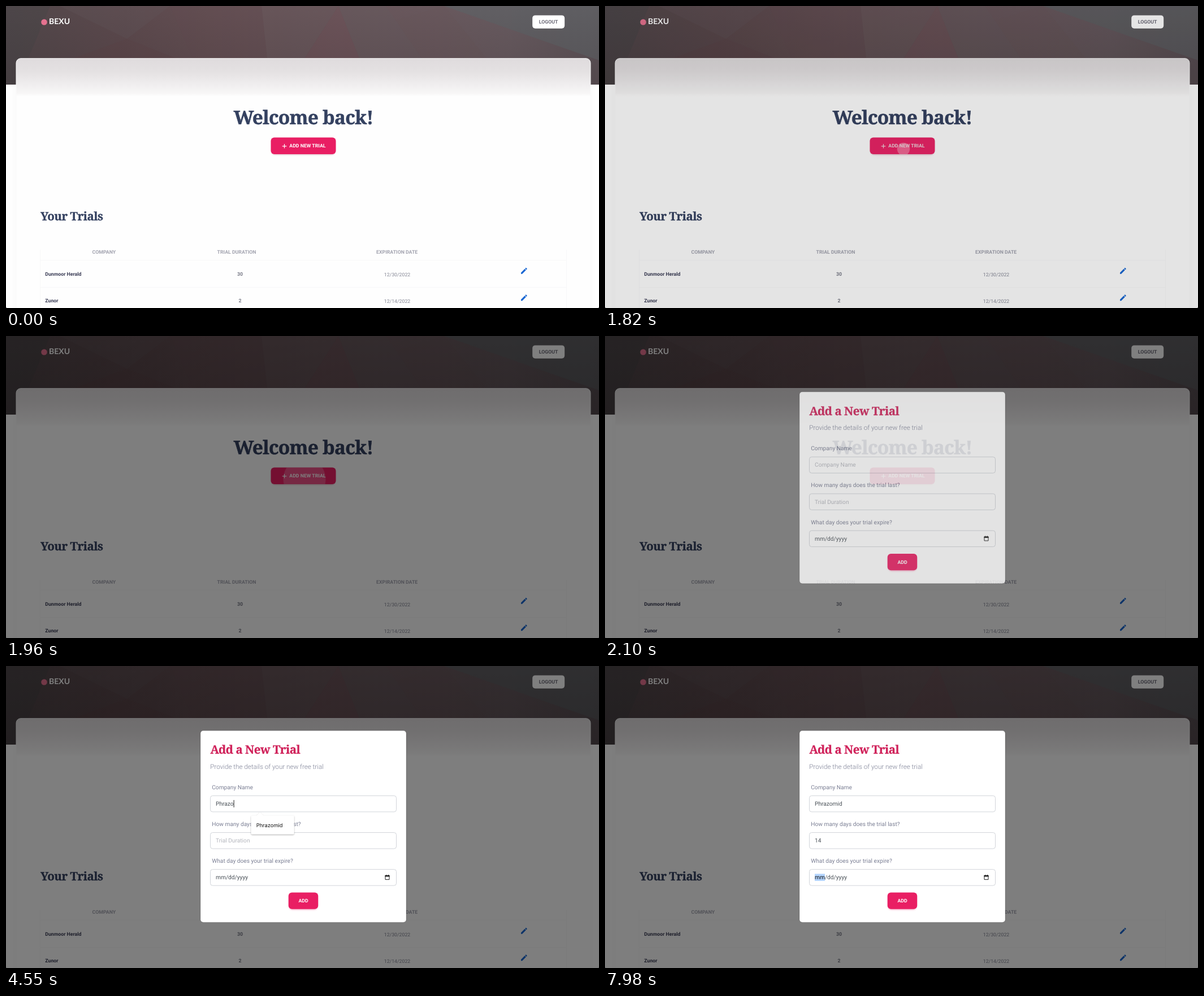
These frames come from a looping animation (1049 px wide and 534 px high, 8 s). An HTML page:

```html
<!DOCTYPE html>
<html lang="en">
<head>
<meta charset="utf-8">
<title>Free trial tracker</title>
<style>
  html, body { margin: 0; width: 100%; height: 100%; overflow: hidden; background: #fefefe; }
  svg { display: block; width: 100vw; height: 100vh; }
  text { font-family: Roboto, sans-serif; text-rendering: geometricPrecision; white-space: pre; }
  .slab { font-family: "Noto Serif", serif; font-weight: 700; font-size: 20.5px;
    letter-spacing: -0.024em; stroke-width: .3; }
  .big { font-size: 33.4px; letter-spacing: -0.022em; stroke-width: .5; }
  .navy { fill: #344160; stroke: #344160; }
  .pink { fill: #d0235b; stroke: #d0235b; }
  .logo { font-family: Lato, sans-serif; font-weight: 700; }
  .menu { font-family: Inter, sans-serif; font-size: 9.3px; }
  .small { font-size: 8.74px; }
  .bold { font-size: 8.74px; font-weight: 700; }
  .form { font-size: 10.2px; }
  .mid { text-anchor: middle; }
</style>
</head>
<body>
<svg id="stage" viewBox="0 0 1049 534" preserveAspectRatio="none"></svg>
<script>
const LOOP = 8000;
const COMPANY = "Phrazomid";
const KEY_TIMES = [3640, 3780, 3990, 4270, 4410, 4550, 4690, 4830, 4970];
const DAYS = "14";
const DAY_TIMES = [6580, 6790];
const MENU = ["Zunor", "Dunmoor Herald", "Quovar", "test2", "Tibaro+", COMPANY];

const text = (x, y, cls, fill, str, extra = "") =>
  `<text x="${x}" y="${y}" class="${cls}" fill="${fill}" ${extra}>${str}</text>`;
const heading = (x, y, cls, str) =>
  `<text x="${x}" y="${y}" class="slab ${cls}">${str}</text>`;
const box = (x, y, w, h, r, fill, extra = "") =>
  `<rect x="${x}" y="${y}" width="${w}" height="${h}" rx="${r}" fill="${fill}" ${extra}/>`;
const poly = (points, fill, alpha) =>
  `<polygon points="${points}" fill="${fill}" opacity="${alpha}"/>`;
const line = d => `<path d="${d}" stroke="#f7f7f8" fill="none"/>`;

const defs = `<defs>
  <linearGradient id="sky">
    <stop offset="0" stop-color="#51474a"/><stop offset=".2" stop-color="#5c494d"/>
    <stop offset=".42" stop-color="#665256"/><stop offset=".6" stop-color="#69565b"/>
    <stop offset=".85" stop-color="#675a5f"/><stop offset="1" stop-color="#5d5257"/>
  </linearGradient>
  <linearGradient id="shade" x1="0" y1="0" x2="0" y2="1">
    <stop offset="0" stop-color="#1c1618" stop-opacity="0"/>
    <stop offset="1" stop-color="#1c1618" stop-opacity=".16"/>
  </linearGradient>
  <linearGradient id="glass" gradientUnits="userSpaceOnUse" x1="0" y1="92" x2="0" y2="160">
    <stop offset="0" stop-color="#dfdbdd"/><stop offset=".35" stop-color="#e4e1e2"/>
    <stop offset=".7" stop-color="#f0eeef"/><stop offset=".92" stop-color="#f8f7f7"/>
    <stop offset="1" stop-color="#fefefe"/>
  </linearGradient>
  <filter id="soft" x="-20%" y="-20%" width="140%" height="140%"><feGaussianBlur stdDeviation="7"/></filter>
  <filter id="blur" x="-20%" y="-60%" width="140%" height="260%"><feGaussianBlur stdDeviation="1.5"/></filter>
  <filter id="glow" x="-20%" y="-60%" width="140%" height="260%"><feGaussianBlur stdDeviation="4"/></filter>
  <filter id="drop" x="-10%" y="-10%" width="120%" height="125%">
    <feDropShadow dx="0" dy="1" stdDeviation="1.3" flood-opacity=".38"/>
  </filter>
  <clipPath id="pill">${box(468.5, 232.5, 115, 29.5, 6, "#000")}</clipPath>
</defs>`;

const header = box(0, 0, 1049, 139, 0, "url(#sky)")
  + poly("0,0 78,0 20,139 0,139", "#484547", .45)
  + poly("95,0 290,0 214,58", "#61565a", .3)
  + poly("214,58 300,92 120,92", "#5c4248", .3)
  + poly("290,0 452,0 462,92 330,92", "#624b50", .4)
  + poly("452,0 588,0 528,92 462,92", "#69595d", .5)
  + poly("588,0 529,92 625,92", "#6f5157", .45)
  + poly("588,0 672,0 735,92 625,92", "#675a5e", .5)
  + poly("672,0 775,0 1049,96 1049,0", "#606164", .8)
  + poly("775,0 850,92 735,92 690,25", "#69565b", .35)
  + box(0, 0, 1049, 139, 0, "url(#shade)")
  + `<circle cx="67.5" cy="28.5" r="5.3" fill="#e5718f"/>`
  + text(76, 32.2, "logo", "#fff", "BEXU", 'font-size="14"')
  + box(931.2, 16.4, 57, 23.4, 5, "#fff")
  + text(959.6, 31.2, "bold mid", "#6d6b78", "LOGOUT");

const panel = box(16, 100, 1020, 480, 12, "#000", 'filter="url(#soft)" opacity=".02"')
  + box(18, 92.7, 1016, 470, 8, "url(#glass)", 'stroke="#fafafa"');

const pencil = y => `<path transform="translate(909.2 ${y}) scale(.6)" fill="#1967d2"
  d="M3 17.25V21h3.75L17.81 9.94l-3.75-3.75zM20.71 7.04a1 1 0 0 0 0-1.41l-2.34-2.34a1 1 0 0 0-1.41 0l-1.83 1.83 3.75 3.75z"/>`;
const row = (y, name, days, date) =>
  text(69.3, y, "bold", "#3a3c55", name)
  + text(414, y, "bold mid", "#777986", days)
  + text(692, y + .9, "small mid", "#858795", date)
  + pencil(y - 15.6);

const table = heading(61, 378.8, "navy", "Your Trials")
  + ["COMPANY", "TRIAL DURATION", "EXPIRATION DATE"].map((label, i) =>
      text([173.3, 408, 691.7][i], 438.2, "bold mid", "#a3a4b0", label)).join("")
  + line("M60.5 431V534M991.5 431V534M60 449.5H991M60 497.5H991")
  + row(476.7, "Dunmoor Herald", "30", "12/30/2022")
  + row(524.2, "Zunor", "2", "12/14/2022");

const welcome = heading(526.2, 209.4, "big navy mid", "Welcome back!")
  + box(470, 235.5, 112, 27.5, 6, "#8c2346", 'filter="url(#blur)" opacity=".32"')
  + box(474, 241, 104, 24, 8, "#e91e63", 'id="lift" filter="url(#glow)"')
  + box(468.5, 232.5, 115, 29.5, 6, "#e91e63", 'id="newBtn"')
  + `<g clip-path="url(#pill)"><circle id="ripple" cx="528" cy="253" r="0" fill="#fff"/></g>`
  + `<g id="newLabel"><path d="M488.7 247.8H496.3M492.5 244V251.6" stroke="currentColor" stroke-width="1.2"/>`
  + text(501.3, 250.4, "bold", "currentColor", "ADD NEW TRIAL") + `</g>`;

const field = (y, label, id) =>
  text(364.2, y - 11.3, "form", "#7b7f94", label)
  + box(361.5, y + .2, 329, 28.5, 4, "#fff", 'stroke="#d2d5da"')
  + text(371, y + 17.8, "form", "#495057", "", `id="${id}"`);

const spinner = `<g id="spinner">${box(670.5, 302, 10.5, 13, 1, "#f1f1f1")}
  <path d="M672.8 306.8L675.5 303.7L678.2 306.8ZM672.8 310.4L675.5 313.5L678.2 310.4Z" fill="#444"/></g>`;
const calendar = `<path d="M671 370.6H678V377.6H671Z" fill="none" stroke="#222"/>
  <path d="M670.5 370.1H678.5V372.6H670.5ZM672 369H673.2V371H672ZM675.8 369H677V371H675.8Z" fill="#222"/>`;

const modal = `<g id="modal">`
  + box(344, 114.3, 364, 339, 5, "#fff", 'stroke="#000" stroke-opacity=".18"')
  + heading(361.5, 155.2, "pink", "Add a New Trial")
  + text(361.3, 181.8, "", "#7b7f94", "Provide the details of your new free trial", 'font-size="11.65" font-weight="300"')
  + field(229.2, "Company Name", "company")
  + field(294.3, "How many days does the trial last?", "days")
  + field(359.5, "What day does your trial expire?", "date")
  + box(371, 367.5, 18, 12.5, 0, "#b3d4fd", 'id="select"')
  + text(371, 377.3, "form", "#495057", '<tspan id="month">mm</tspan>/dd/yyyy')
  + spinner + calendar
  + box(501, 403.5, 50, 27.5, 6, "#e91e63", 'filter="url(#blur)" opacity=".4"')
  + box(499.7, 400.5, 52.5, 29.3, 6, "#e91e63")
  + text(526, 418.2, "bold mid", "#fff", "ADD")
  + box(0, 0, 1, 13, 0, "#222", 'id="caret"')
  + `</g>`;

const menu = `<g id="menu" filter="url(#drop)">`
  + `<path d="M443 265L449.3 258.8L455.6 265Z" fill="#fff"/>`
  + box(433.6, 264.6, 97, 164.4, 2, "#fff", 'id="menuBox"')
  + MENU.map((name, i) => text(442.7, 284.6 + i * 26.35, "menu", "#111", name)).join("")
  + `</g>`;

const corners = `<path d="M0 532.5V534H1.5ZM1049 532.5V534H1047.5Z" fill="#555"/>`;

document.getElementById("stage").innerHTML = defs
  + box(0, 0, 1049, 534, 0, "#fefefe") + header + panel + welcome + table
  + box(0, 0, 1049, 534, 0, "#000", 'id="dim"') + modal + menu + corners;

const $ = id => document.getElementById(id);
const menuItems = [...$("menu").querySelectorAll("text")];
const set = (el, attrs) => { for (const k in attrs) el.setAttribute(k, attrs[k]); };
const show = (el, on) => set(el, { visibility: on ? "visible" : "hidden" });
const ramp = (t, from, length) => Math.min(1, Math.max(0, (t - from) / length));
const between = (t, from, to) => t >= from && t < to;
const mix = (a, b, k) => `rgb(${a.map((v, i) => Math.round(v + (b[i] - v) * k))})`;
const typed = (word, times, t) => word.slice(0, times.filter(at => at <= t).length);

function setField(id, value, hint) {
  const el = $(id);
  el.textContent = value || hint;
  set(el, { fill: value ? "#495057" : "#b4b6bd" });
  return value ? el.getComputedTextLength() : 0;
}

function drawButton(t) {
  const hover = ramp(t, 910, 150) * (1 - ramp(t, 1780, 60));
  set($("newBtn"), { fill: mix([233, 30, 99], [236, 48, 108], hover) });
  set($("lift"), { opacity: .18 * hover });
  $("newLabel").style.color = mix([255, 255, 255], [194, 128, 144], hover);
  const grow = ramp(t, 1770, 550);
  set($("ripple"), {
    r: 70 * (1 - (1 - grow) ** 1.8),
    opacity: t < 1770 ? 0 : .3 * (1 - ramp(t, 1900, 250))
  });
}

function drawModal(t) {
  set($("dim"), { opacity: .5 * ramp(t, 1790, 150) });
  const slide = (1 - ramp(t, 1983, 300)) ** 1.7;
  set($("modal"), {
    opacity: ramp(t, 1983, 150),
    transform: `translate(0 ${-36.4 * slide})`
  });
}

function drawForm(t) {
  const name = typed(COMPANY, KEY_TIMES, t);
  const nameWidth = setField("company", name, "Company Name");
  const daysWidth = setField("days", typed(DAYS, DAY_TIMES, t), "Trial Duration");

  const inName = between(t, 3640, 5470);
  const inDays = between(t, 6230, 7280) || between(t, 7770, 7980);
  show($("caret"), inName || inDays);
  set($("caret"), {
    x: 371 + (inName ? nameWidth : daysWidth),
    y: inName ? 237 : 302
  });

  show($("spinner"), between(t, 5530, 7980));
  show($("select"), t >= 7980);
  set($("month"), { fill: t >= 7980 ? "#111" : "#495057" });

  const open = between(t, 3150, 4970);
  const filtered = name.length > 0;
  show($("menu"), open);
  set($("menuBox"), { width: filtered ? 76 : 97, height: filtered ? 33 : 164.4 });
  menuItems.forEach((item, i) => {
    show(item, open && MENU[i].startsWith(name));
    set(item, { y: 284.6 + (filtered ? 0 : i * 26.35) });
  });
}

const start = performance.now();
function frame() {
  const t = (performance.now() - start) % LOOP;
  drawButton(t);
  drawModal(t);
  drawForm(t);
  requestAnimationFrame(frame);
}
frame();
</script>
</body>
</html>
```
